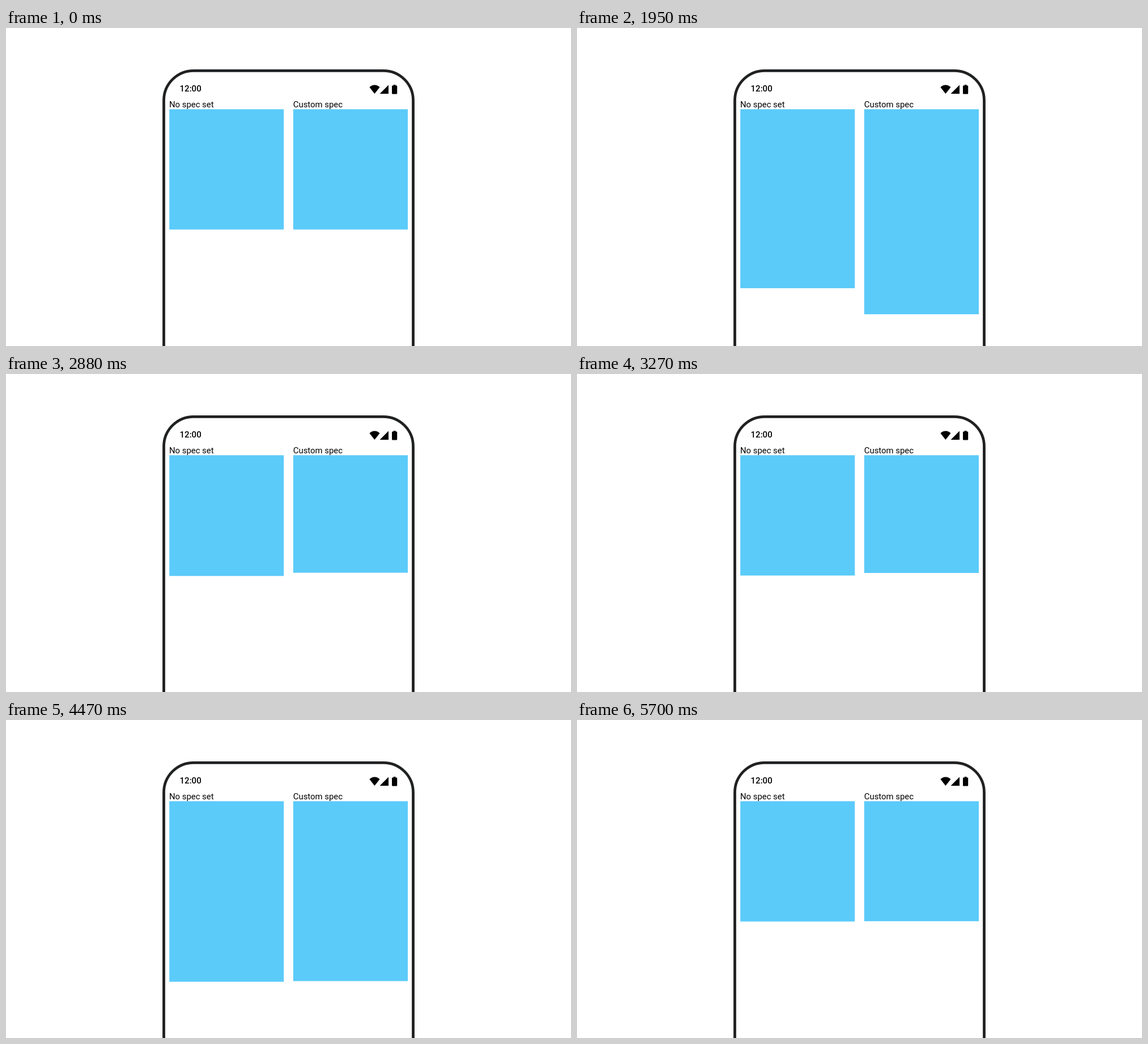
These frames come from a looping animation (997 by 561 pixels, 6630 ms). An HTML page:

```html
<!DOCTYPE html>
<html lang="en">
<head>
<meta charset="utf-8">
<title>Size animation: default and custom spring</title>
<style>
  html, body { margin: 0; width: 100%; height: 100%; overflow: hidden; background: #fff; }
  svg { display: block; }
  text { font: 14.875px Roboto, sans-serif; }
  .clock { font-size: 15px; font-weight: 500; }
  .box { fill: #5bcbfa; }
</style>
</head>
<body>
<svg width="997" height="561" viewBox="0 0 997 561">
  <rect x="278.5" y="75.3" width="440" height="700" rx="52.5" fill="#fff" stroke="#202122" stroke-width="4.8"/>
  <text class="clock" x="306.6" y="111.5">12:00</text>
  <path d="M650.4 116 641.4 104.6C646.5 99.2 654.5 99.2 659.5 104.6ZM675 100.6V116H659.6Z"/>
  <path d="M683.8 100h3.6v1.6h1.6q1.2 0 1.2 1.2v12.4q0 1.2-1.2 1.2h-6.8q-1.2 0-1.2-1.2v-12.4q0-1.2 1.2-1.2h1.6z"/>
  <text x="288" y="140">No spec set</text>
  <text x="506.8" y="140">Custom spec</text>
  <rect id="plain" class="box" x="288.2" y="143.3" width="202"/>
  <rect id="bouncy" class="box" x="506.8" y="143.3" width="202.2"/>
  <g id="touch">
    <circle r="15" fill="#a6c8e6" opacity=".4"/>
    <circle r="11" fill="#fff" opacity=".68"/>
  </g>
</svg>
<script>
const LOOP = 6630, STEP = 30, LAST_CHANGE = 5700;
const SPEED = 10 / 9;                 // playback is slightly faster than real time
const COLLAPSED = 212.2, GROWTH = 106.25;
const LATENCY = 36, FADE = 180;

// Each tap toggles the size: start of the resize, moment of touch down, position.
const taps = [
  { start: 1700, down: 1470, x: 369, y: 248 },
  { start: 2566, down: 2420, x: 364.7, y: 249.5 },
  { start: 3737, down: 3590, x: 371, y: 256 },
  { start: 4763, down: 4620, x: 371, y: 266 },
];

const [plain, bouncy, touch] = ['plain', 'bouncy', 'touch'].map(id => document.getElementById(id));

// Step response of a damped spring, t in seconds.
function spring(t, stiffness, damping) {
  const w = Math.sqrt(stiffness);
  if (damping === 1) return 1 - (1 + w * t) * Math.exp(-w * t);
  const root = Math.sqrt(1 - damping * damping), a = w * root * t;
  return 1 - Math.exp(-damping * w * t) * (Math.cos(a) + damping / root * Math.sin(a));
}

// Springs are linear, so an interrupted animation is a sum of step responses.
function height(time, stiffness, damping) {
  return taps.reduce((h, { start }, i) => {
    const t = Math.max(0, time - start) / 1000 * SPEED;
    return h + (i % 2 ? -1 : 1) * GROWTH * spring(t, stiffness, damping);
  }, COLLAPSED);
}

function render(now) {
  const time = Math.min(Math.floor(now % LOOP / STEP) * STEP, LAST_CHANGE);
  plain.setAttribute('height', height(time, 400, 1));
  bouncy.setAttribute('height', height(time, 200, 0.2));

  const tap = taps.find(p => time >= p.down && time < p.start - LATENCY + FADE);
  touch.setAttribute('opacity', tap ? Math.min(1, 1 - (time - tap.start + LATENCY) / FADE) : 0);
  if (tap) touch.setAttribute('transform', `translate(${tap.x} ${tap.y})`);
}

const origin = performance.now();
function frame() {
  render(performance.now() - origin);
  requestAnimationFrame(frame);
}
frame();
</script>
</body>
</html>
```
